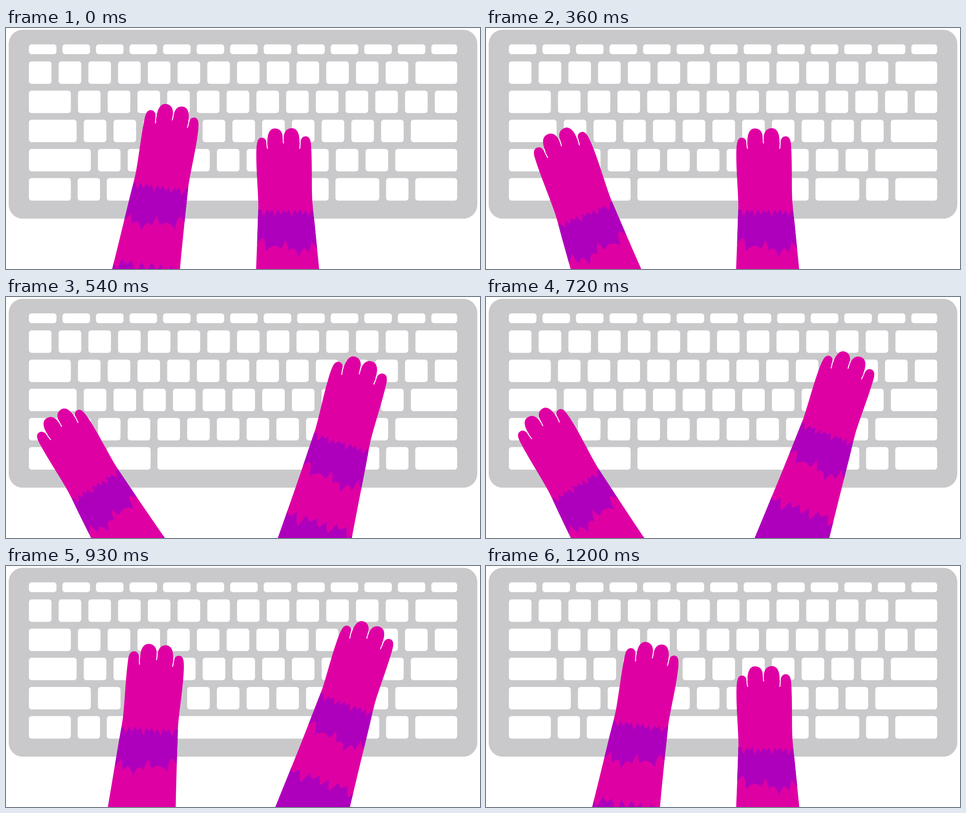
Recreate the animation shown at these times as an HTML page. Size 1049x534 px, loop 1.68 s.

```html
<!DOCTYPE html>
<html lang="en">
<head>
<meta charset="utf-8">
<title>Typing paws</title>
<style>
  html, body { margin: 0; width: 100%; height: 100%; overflow: hidden; background: #fff; }
  svg { display: block; width: 100%; height: 100%; }
</style>
</head>
<body>
<svg id="stage" viewBox="0 0 1049 534"></svg>
<script>
const LOOP = 1680, STEP = 30;
const PINK = '#df00a4', PURPLE = '#ae00bc', GREY = '#c9c9cb';
const stage = document.getElementById('stage');

function add(parent, tag, attrs = {}) {
  const el = document.createElementNS('http://www.w3.org/2000/svg', tag);
  for (const k in attrs) el.setAttribute(k, attrs[k]);
  return parent.appendChild(el);
}

// Keyboard: each row runs from LEFT to RIGHT, a last key fills what is left
const LEFT = 50.7, RIGHT = 998.4, UNIT = 50;
const units = n => Array(n).fill(UNIT);

function row(y, height, widths, gap) {
  let x = LEFT;
  for (const w of [...widths, RIGHT]) {
    const width = Math.min(w, RIGHT - x);
    if (width < 20) break;
    add(stage, 'rect', { x, y, width, height, rx: 6, fill: '#fff' });
    x += width + gap;
  }
}

add(stage, 'rect', { x: 6, y: 4, width: 1037, height: 418.5, rx: 31, fill: GREY });
row(36.3, 21.8, Array(12).fill(61), 13.22);
const side = [92.8, 49.5, 97];
[units(13), [92.8, ...units(13)], [105.6, ...units(11)], [137, ...units(10)]]
  .forEach((widths, i) => row(74 + i * 64.65, 49.8, widths, 15.8));
row(332.6, 49.8, [...side, 379, ...side.reverse()], 15.03);

// One arm, drawn as the right one; the left one is its mirror image
const OUTLINE = 'M545 720L553.5 534L556 470L558.5 395C558 360 554 320 554 285C554 258 555 243 566 243' +
  'C572 243 576 247 576.5 254L578.5 254C578 236 583 222.5 595 222.5C607 222.5 613 232 612.5 246' +
  'L614.5 246C614 232 620 222 632 222C644 222 650 233 649.5 254L651 254C653 244 657 240 663 240' +
  'C671 240 674 247 675 258C678 300 676 350 678 385Q680 410 683 434L693 534L712 720Z';
const SLITS = 'M576.8 248Q577 258 578.6 267M613.3 240Q613.3 248 614 255M651 248Q651.3 258 650 267';
const SCALLOPS = 'L690 490Q680 482 676 471Q673 492 669 497Q664 488 659 488Q653 493 648 508' +
  'Q643 492 638 489Q632 487 626 494Q622 476 617 470Q613 487 608 489Q598 480 592 483' +
  'Q582 485 575 494Q573 466 567 465Q558 472 552 484Z';

// Row of leaning tufts with uneven depth
function tufts(x, y, step, n, depth, phase) {
  let d = `M${x - step} ${y}`;
  for (let i = 0; i < n; i++) {
    const px = x + i * step, tip = y + depth * (1 + 0.45 * Math.cos(2.35 * (i - phase)));
    d += `L${px} ${y}Q${px + step * 0.2} ${tip - 2} ${px + step * 0.45} ${tip}`;
  }
  return d + `L${x + n * step} ${y}`;
}

const defs = add(stage, 'defs');
add(add(defs, 'clipPath', { id: 'inside' }), 'path', { d: OUTLINE });
const art = add(defs, 'g', { id: 'arm' });
add(art, 'path', { d: OUTLINE, fill: PINK });
const bands = add(art, 'g', { 'clip-path': 'url(#inside)', fill: PURPLE });
add(bands, 'path', { d: tufts(565, 402, 12.4, 10, 11, 5) + SCALLOPS });
add(bands, 'path', { d: tufts(550, 575, 22, 7, 18, 1) + 'V730H530Z' });
add(art, 'path', { d: SLITS, fill: 'none', stroke: '#fff', 'stroke-width': 2, 'stroke-linecap': 'round' });

// out and back are [start, duration] in ms
const arms = [
  { place: 'translate(368 204.7) rotate(8) scale(-1 1) translate(-614 -256)',
    pivot: [530, 321], move: [-207.7, -48.4], turn: -40, out: [203, 240], back: [693, 300] },
  { place: '',
    pivot: [439, 366], move: [160.1, -162.8], turn: 19.8, out: [362, 240], back: [899, 308] }
];
for (const arm of arms) {
  arm.node = add(stage, 'g');
  add(arm.node, 'use', { href: '#arm', transform: arm.place });
}

// Motion: each arm swings out and back, growing a little while lifted
const LIFT = 0.078;

function ease(t, [start, span]) {
  const u = Math.min(1, Math.max(0, (t - start) / span));
  return (1 - Math.cos(Math.PI * u)) / 2;
}

function pose({ node, pivot: [x, y], move: [dx, dy], turn, out, back }, t) {
  const p = ease(t, out) - ease(t, back);
  const scale = 1 + LIFT * 4 * p * (1 - p);
  node.setAttribute('transform',
    `translate(${x + dx * p} ${y + dy * p}) rotate(${turn * p}) scale(${scale}) translate(${-x} ${-y})`);
}

const begin = performance.now();
function tick() {
  const now = (performance.now() - begin) % LOOP;
  const t = Math.floor(now / STEP) * STEP;
  arms.forEach(arm => pose(arm, t));
  requestAnimationFrame(tick);
}
tick();
</script>
</body>
</html>
```
